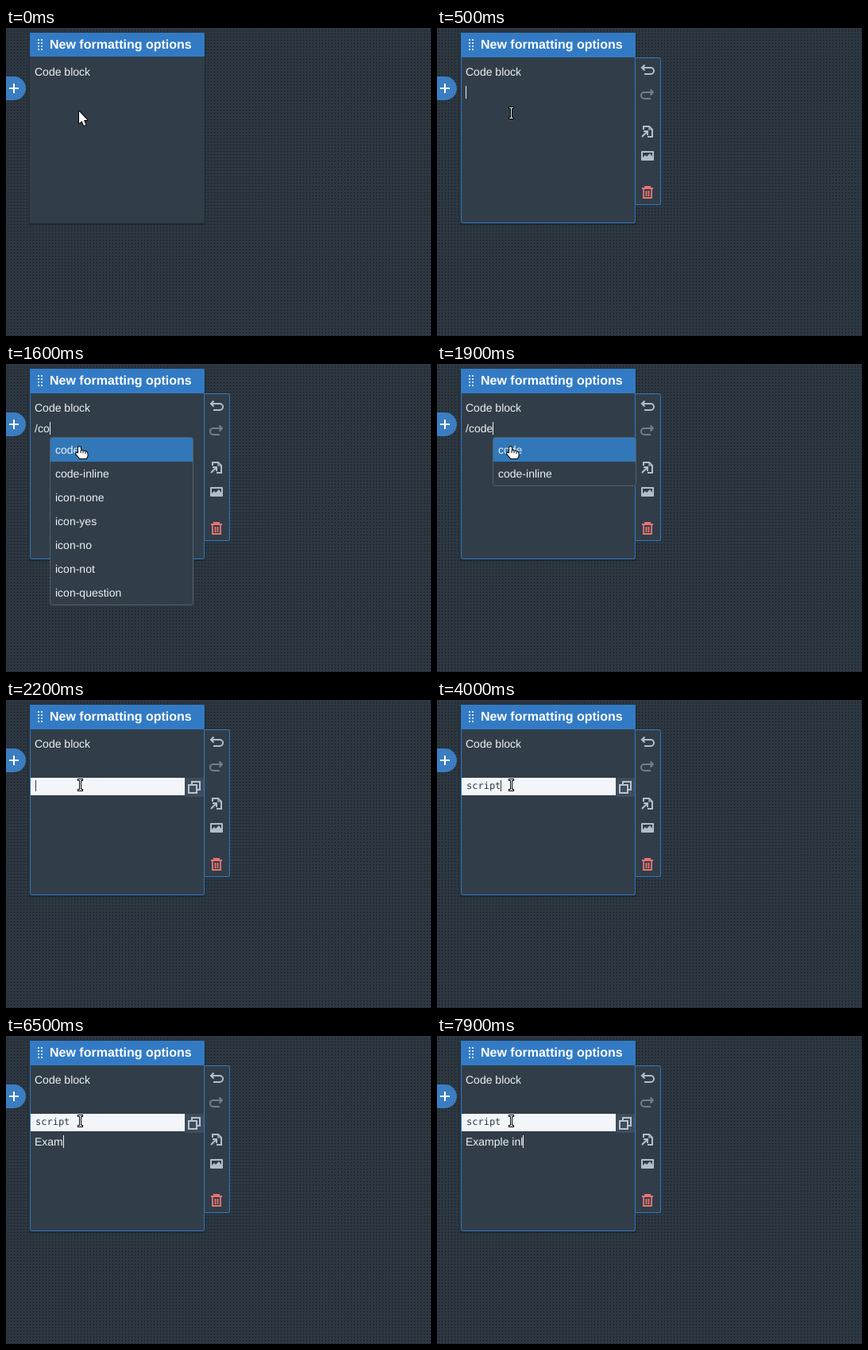
Write an HTML page with a canvas that moves like this. It is 535 px wide and 388 px high and loops after 8000 ms.

```html
<!DOCTYPE html>
<html lang="en">
<head>
<meta charset="utf-8">
<title>Note editor</title>
<style>
html, body { margin: 0; width: 100%; height: 100%; overflow: hidden; background: #2c343e; }
canvas { display: block; width: 535px; height: 388px; }
</style>
</head>
<body>
<canvas id="stage" width="535" height="388"></canvas>
<script>
const ctx = document.getElementById('stage').getContext('2d');
ctx.textRendering = 'geometricPrecision';
const LOOP = 8000;
const SANS = '14px "Liberation Sans", Arial, sans-serif';
const BOLD = 'bold 16px "Liberation Sans", Arial, sans-serif';
const MONO = '12px "DejaVu Sans Mono", monospace';
const BLUE = '#327bc4', PANEL = '#313e49', TEXT = '#eef1f4', ICON = '#b4bec8', RED = '#ea7474';

// Each list holds [start time, state].
const TYPED = {
  command: [[1100, 1], [1400, 2], [1600, 3], [1700, 4], [1900, 5]],
  code: [[3200, 1], [3300, 2], [3500, 3], [3700, 4], [3900, 5], [4000, 6]],
  body: [[6000, 1], [6200, 2], [6400, 3], [6500, 4], [6700, 5], [6800, 6],
         [6900, 7], [7000, 8], [7600, 9], [7700, 10], [7900, 11]]
};
const CURSORS = [[0, arrow], [300, beam], [1100, arrow], [1400, hand], [2200, beam]];
const CARET_OFF = [[900, 1100], [2800, 3200], [4600, 4700], [5300, 6000]];

const MENU_ALL = ['header', 'today', 'now', 'form', 'table', 'code', 'code-inline'];
const MENU_C = ['code', 'code-inline', 'icon-none', 'icon-yes', 'icon-no', 'icon-not', 'icon-question'];

function stateAt(list, t, initial) {
  let state = initial;
  for (const [start, value] of list) if (t >= start) state = value;
  return state;
}

function rect(x, y, w, h, color) {
  ctx.fillStyle = color;
  ctx.fillRect(x, y, w, h);
}

function rounded(x, y, w, h, r, color) {
  ctx.beginPath();
  ctx.roundRect(x, y, w, h, r);
  ctx.fillStyle = color;
  ctx.fill();
}

function frame(x, y, w, h, r, color) {
  ctx.beginPath();
  ctx.roundRect(x + .5, y + .5, w - 1, h - 1, r);
  ctx.strokeStyle = color;
  ctx.lineWidth = 1;
  ctx.stroke();
}

function text(str, x, y, font = SANS, color = TEXT) {
  ctx.font = font;
  ctx.fillStyle = color;
  ctx.fillText(str, x, y);
}

function widthOf(str, font) {
  ctx.font = font;
  return ctx.measureText(str).width;
}

function stroke(d, color, width = 2) {
  ctx.strokeStyle = color;
  ctx.lineWidth = width;
  ctx.stroke(new Path2D(d));
}

function fill(d, color) {
  ctx.fillStyle = color;
  ctx.fill(new Path2D(d), 'evenodd');
}

function at(x, y, draw) {
  ctx.save();
  ctx.translate(x, y);
  draw();
  ctx.restore();
}

const tile = document.createElement('canvas');
tile.width = tile.height = 4;
const tileCtx = tile.getContext('2d');
tileCtx.fillStyle = '#2d3741';
tileCtx.fillRect(0, 0, 4, 4);
tileCtx.fillStyle = '#0e1319';
tileCtx.fillRect(2, 3, 1, 1);
const dots = ctx.createPattern(tile, 'repeat');

function background() {
  rect(0, 0, 535, 388, dots);
  rounded(-5, 61, 30, 30, [0, 15, 15, 0], '#3a7dc0');
  rect(4, 75, 12, 2, '#fff');
  rect(9, 70, 2, 12, '#fff');
}

function note(focused) {
  ctx.save();
  ctx.shadowColor = 'rgba(0,0,0,.45)';
  ctx.shadowBlur = 3;
  ctx.shadowOffsetY = 1;
  rounded(30, 6, 220, 240, [0, 0, 2, 2], PANEL);
  ctx.restore();
  rect(30, 6, 220, 30, BLUE);
  for (let row = 0; row < 4; row++) {
    rect(40, 14 + row * 4, 2, 2, '#dbe8f5');
    rect(44, 14 + row * 4, 2, 2, '#dbe8f5');
  }
  text('New formatting options', 55, 26, BOLD, '#fff');
  text('Code block', 36, 60);
  if (focused) frame(30, 36, 220, 210, [0, 0, 2, 2], BLUE);
}

function undo(color) {
  stroke('M-6 -3H4A4 4 0 0 1 4 5H-4', color);
  stroke('M-3.5 -6.5L-7 -3L-3.5 .5', color);
}

function toolbar() {
  rect(249, 37, 33, 186, PANEL);
  frame(249, 37, 33, 186, [0, 2, 2, 0], BLUE);
  at(265, 53, () => undo(ICON));
  at(265, 84, () => { ctx.scale(-1, 1); undo('#71808d'); });
  at(265, 130, () => {
    stroke('M-5 -2V-6H2L6 -2V7H0', ICON);
    stroke('M2 -6V-2H6', ICON, 1.2);
    stroke('M-7 7L0 0M-5 0H0V5', ICON);
  });
  at(265, 161, () => {
    rounded(-8, -6, 16, 12, 1, ICON);
    rect(-6, -4, 12, 8, PANEL);
    fill('M-6 4V2L-3 -1L-1 1L3 -3L6 1V4Z', ICON);
  });
  at(265, 207, () => {
    stroke('M-7 -5H7M-3 -5V-7H3V-5', RED);
    stroke('M-5 -4V7H5V-4M-1.5 -2V5M1.5 -2V5', RED, 1.8);
  });
}

function caret(x, y, h, color) {
  rect(Math.floor(x), y, 1, h, color);
}

function codeBlock(code) {
  rect(31, 98, 194, 22, '#f2f5f9');
  rounded(225, 98, 24, 24, 2, '#3f4c5b');
  stroke('M234 107V103H244V113H240', '#b9c4cf');
  stroke('M230 107H240V117H230Z', '#b9c4cf');
  text(code, 37, 112, MONO, '#303a45');
}

function menu(typed) {
  const items = typed < 2 ? MENU_ALL : typed < 4 ? MENU_C : MENU_C.slice(0, 2);
  const x = Math.round(36 + widthOf('/code'.slice(0, typed), SANS));
  const h = items.length * 30 + 2;
  rounded(x, 92, 181, h, 3, PANEL);
  frame(x, 92, 181, h, 3, '#53616d');
  rect(x + 1, 93, 179, 30, '#3278b8');
  items.forEach((item, i) => text(item, x + 7, 113 + i * 30));
}

function outlined(d) {
  ctx.lineJoin = 'round';
  stroke(d, '#000', 2);
  fill(d, '#fff');
  ctx.lineJoin = 'miter';
}

function arrow() {
  at(92, 105, () => outlined('M0 0V15L3.5 12L6 18L8.5 17L6 11H10.5Z'));
}

function beam() {
  at(90, 99, () => {
    fill('M0 0H7V3H5V13H7V16H0V13H2V3H0Z', '#000');
    fill('M1 1H6V2H4V14H6V15H1V14H3V2H1Z', '#fff');
  });
}

function hand() {
  at(87, 104, () => {
    outlined('M4 1Q5.5 -.5 7 1V5L14 6.5Q15.5 7 15.5 9V12L14 15H6L1 9Q1 7.5 3 8L4 9Z');
    stroke('M7 5V8M10 6V8.5M13 6.5V9', '#000', 1);
  });
}

function draw(t) {
  const command = stateAt(TYPED.command, t, 0);
  const code = 'script'.slice(0, stateAt(TYPED.code, t, 0));
  const body = 'Example inl'.slice(0, stateAt(TYPED.body, t, 0));
  const caretOn = t >= 500 && !CARET_OFF.some(([a, b]) => t >= a && t < b);

  background();
  note(t >= 500);
  if (t >= 500) toolbar();

  if (t >= 2200) {
    codeBlock(code);
    text(body, 36, 138);
    if (caretOn && t < 4700) caret(37 + widthOf(code, MONO), 101, 14, '#303a45');
    else if (caretOn) caret(Math.round(36 + widthOf(body, SANS)), 125, 16, TEXT);
  } else {
    const line = '/code'.slice(0, command);
    text(line, 36, 86);
    if (caretOn) caret(Math.round(36 + widthOf(line, SANS)), 73, 16, TEXT);
    if (command) menu(command);
  }
  stateAt(CURSORS, t, arrow)();
}

const started = performance.now();
function tick() {
  draw((performance.now() - started) % LOOP);
  requestAnimationFrame(tick);
}
tick();
</script>
</body>
</html>
```
